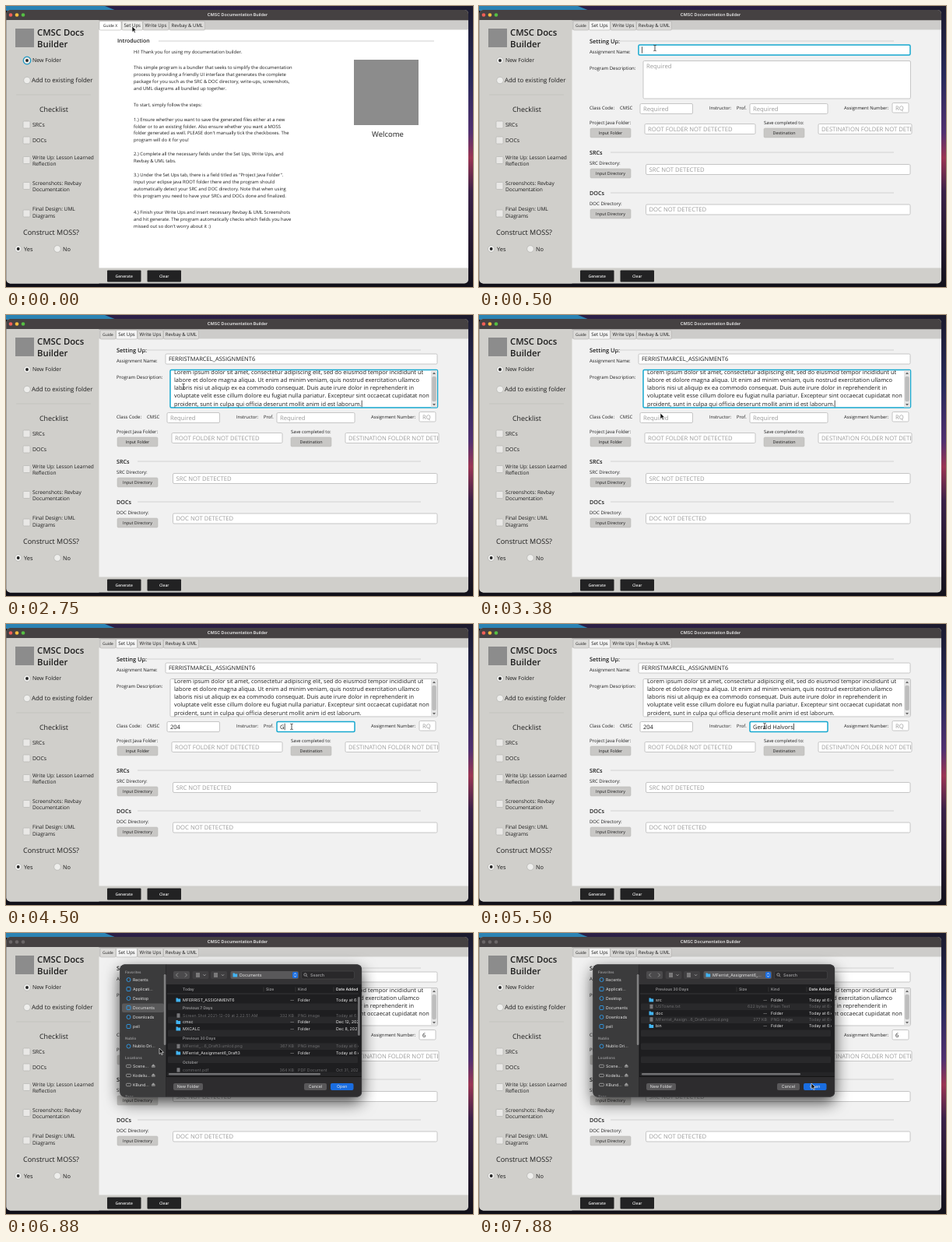
Write an HTML page that moves like this. It is 600 by 361 pixels and loops after 8000 ms.

```html
<!DOCTYPE html>
<html lang="en">
<head>
<meta charset="utf-8">
<title>CMSC Documentation Builder</title>
<style>
  html, body { margin: 0; width: 100%; height: 100%; overflow: hidden; background: #111018; }
  svg { display: block; width: 600px; height: 361px; }
  text { font-family: "Open Sans", "Noto Sans", sans-serif; text-rendering: geometricPrecision; fill: #1c1c1c; white-space: pre; }
  .mac text { font-family: Inter, Roboto, sans-serif; fill: #e6e6e6; }
  .mac .dim { fill: #6b6b6d; }
  .mac .head { fill: #98989a; font-weight: 600; }
  .mid { text-anchor: middle; }
  .semi { font-weight: 600; }
  text.light { fill: #f4f4f4; }
  text.prompt { fill: #9b9b9b; font-size: 7.7px; }
</style>
</head>
<body>
<svg id="stage" viewBox="0 0 600 361" xmlns="http://www.w3.org/2000/svg"></svg>
<script>
const STEP = 125, LOOP = 8000;
const stage = document.getElementById('stage');

// Markup helpers; text is placed by its vertical centre.
const text = (x, y, size, str, cls = '') =>
  `<text x="${x}" y="${(y + size * .35).toFixed(2)}" font-size="${size}" class="${cls}">${str}</text>`;
const box = (x, y, w, h, fill, r = 0, more = '') =>
  `<rect x="${x}" y="${y}" width="${w}" height="${h}" rx="${r}" fill="${fill}" ${more}/>`;
const line = (x1, y, x2, color) =>
  `<path d="M${x1} ${y}H${x2}" stroke="${color}" stroke-width=".8"/>`;
const group = (id, body, more = '') => `<g id="${id}" ${more}>${body}</g>`;
const rows = (x, size, list) => list.map(([y, s]) => text(x, y, size, s)).join('');

const radio = (x, y, on) =>
  `<circle cx="${x}" cy="${y}" r="4.3" fill="#eeeeec" stroke="#b4b3b0" stroke-width=".7"/>` +
  (on ? `<circle cx="${x}" cy="${y}" r="1.9" fill="#222"/>` : '');
const check = y => box(22, y - 4.5, 9, 9, '#e9e8e6', 1.2, 'stroke="#b7b6b3" stroke-width=".7"');
const button = (y, s, x = 143) =>
  box(x, y, 52, 12, '#c8c7c5', 1.5, 'stroke="#b6b5b3" stroke-width=".5"') +
  text(x + 26, y + 6, 5.4, s, 'mid');

function desktop() {
  return `<defs>
    <linearGradient id="sky" x2="0" y2="1">
      <stop offset="0" stop-color="#1b1a2d"/><stop offset=".25" stop-color="#27295a"/>
      <stop offset=".45" stop-color="#513070"/><stop offset=".54" stop-color="#9a3453"/>
      <stop offset=".66" stop-color="#3a2148"/><stop offset="1" stop-color="#12111b"/>
    </linearGradient>
    <linearGradient id="top"><stop offset="0" stop-color="#2c2048"/><stop offset=".6" stop-color="#2b1f45"/>
      <stop offset="1" stop-color="#1b1a2d"/></linearGradient>
    <clipPath id="win"><rect x=".5" y="5" width="593.5" height="351.5" rx="5"/></clipPath>
    <clipPath id="area"><rect x="211" y="71" width="335" height="48"/></clipPath>
    <clipPath id="dest"><rect x="438" y="150" width="117" height="16"/></clipPath>
    <clipPath id="panel"><rect x="146.5" y="40.5" width="310.5" height="170" rx="6"/></clipPath>
    <clipPath id="list"><rect x="206" y="66" width="247" height="113"/></clipPath>
  </defs>` + box(0, 0, 600, 361, '#111018') + box(0, 0, 600, 6, 'url(#top)') +
    '<path d="M0 0H127L142 6H0z" fill="#2b83b4"/>' + box(592, 0, 8, 361, 'url(#sky)');
}

function sidebar() {
  return box(0, 18, 119.5, 339, '#d0cfcb') + box(12, 29, 24, 24, '#8c8c8c') +
    text(40, 34, 11.3, 'CMSC Docs', 'semi') + text(40, 49.5, 11.3, 'Builder', 'semi') +
    radio(27, 70, true) + radio(27, 95.5) + radio(15.7, 312, true) + radio(66, 312) +
    `<circle id="ring" cx="27" cy="70" r="4.8" fill="none" stroke="#1a9bc9" stroke-width="1.2"/>` +
    text(34, 70, 7, 'New Folder') + text(33, 95.5, 7.9, 'Add to existing folder') +
    line(13, 114, 109, '#c1c0bc') + text(43, 133, 8.9, 'Checklist') +
    [152.5, 172.5, 198, 231, 266.5].map(check).join('') +
    rows(34, 6.9, [[152.5, 'SRCs'], [172.5, 'DOCs']]) +
    rows(34, 6.6, [[194.5, 'Write Up: Lesson Learned'], [203, 'Reflection'], [227.5, 'Screenshots: Revbay'],
      [236, 'Documentation'], [261, 'Final Design: UML'], [269.5, 'Diagrams']]) +
    text(22, 290.5, 9, 'Construct MOSS?') + text(23, 312, 7.4, 'Yes') + text(73, 312, 7.4, 'No');
}

// Tab strip: [left, width, label, size]; the open and the hovered tab are lighter.
const strip = (list, open, fill, hover) => list.map(([x, w, s, size], i) =>
  box(x, 19.5, w, 11.5, i === open ? fill : i === hover ? '#ececea' : '#dbdad8', 1.5,
    'stroke="#b4b3b1" stroke-width=".6"') +
  text(x + w / 2, 25.3, size, s, 'mid')).join('');

function guide() {
  const lines = [[58.5, 'Hi! Thank you for using my documentation builder.'],
    [78.7, 'This simple program is a bundler that seeks to simplify the documentation'],
    [88, 'process by providing a friendly UI interface that generates the complete'],
    [97, 'package for you such as the SRC &amp; DOC directory, write-ups, screenshots,'],
    [106, 'and UML diagrams all bundled up together.'], [127, 'To start, simply follow the steps:'],
    [145.5, '1.) Ensure whether you want to save the generated files either at a new'],
    [154.5, 'folder or to an existing folder. Also ensure whether you want a MOSS'],
    [163, "folder generated as well. PLEASE don't manually tick the checkboxes. The"],
    [171.7, 'program will do it for you!'],
    [189.5, '2.) Complete all the necessary fields under the Set Ups, Write Ups, and'],
    [198.5, 'Revbay &amp; UML tabs.'],
    [216.5, '3.) Under the Set Ups tab, there is a field titled as "Project Java Folder".'],
    [225.5, 'Input your eclipse java ROOT folder there and the program should'],
    [234.5, 'automatically detect your SRC and DOC directory. Note that when using'],
    [243.5, 'this program you need to have your SRCs and DOCs done and finalized.'],
    [264.7, '4.) Finish your Write Ups and insert necessary Revbay &amp; UML Screenshots'],
    [273.8, 'and hit generate. The program automatically checks which fields you have'],
    [282.5, "missed out so don't worry about it :)"]];
  return box(119.5, 30.5, 474.5, 306, '#fff') +
    strip([[120, 28, 'Guide X', 5.1], [149, 26.5, 'Set Ups', 6.1], [176, 33, 'Write Ups', 6.1],
      [210, 45.5, 'Revbay &amp; UML', 6]], 0, '#fff', 1) +
    text(143, 45, 6.9, 'Introduction', 'semi') + line(196, 45, 550, '#c4c4c4') +
    rows(164, 5.9, lines) + box(447, 69, 83, 84, '#8c8c8c') + text(490.5, 164.5, 9.5, 'Welcome', 'mid');
}

// Input fields: position, size and prompt.
const FIELDS = {
  name: [205, 50, 349, 13, ''], about: [211, 70.5, 343.5, 48.5, 'Required'],
  code: [207, 125.5, 67.5, 13, 'Required'], prof: [348, 125.5, 100, 13, 'Required'],
  num: [531, 124.5, 21, 12.5, 'RQ'], root: [213, 151.5, 142, 13, 'ROOT FOLDER NOT DETECTED'],
  dest: [436, 151.5, 120, 13, 'DESTINATION FOLDER NOT DETECTED'],
  src: [214.5, 203.5, 339.5, 13, 'SRC NOT DETECTED'], doc: [214.5, 255, 339.5, 13, 'DOC NOT DETECTED']
};
const field = ([id, [x, y, w, h, prompt]]) =>
  box(x, y, w, h, '#fff', 1.5, `id="${id}Box" stroke="#b9b9b9" stroke-width=".8"`) +
  `<g ${id === 'dest' ? 'clip-path="url(#dest)"' : ''}>` +
  `<text id="${id}Text" x="${x + 4}" y="${y + 9.1}" font-size="7.5" class="prompt">${prompt}</text></g>`;

const LOREM = ['Lorem ipsum dolor sit amet, consectetur adipiscing elit, sed do eiusmod tempor incididunt ut',
  'labore et dolore magna aliqua. Ut enim ad minim veniam, quis nostrud exercitation ullamco',
  'laboris nisi ut aliquip ex ea commodo consequat. Duis aute irure dolor in reprehenderit in',
  'voluptate velit esse cillum dolore eu fugiat nulla pariatur. Excepteur sint occaecat cupidatat non',
  'proident, sunt in culpa qui officia deserunt mollit anim id est laborum.'];

function form() {
  const bar = box(546, 71, 8, 47.5, '#e4e4e4') + box(547.2, 79, 5.6, 32, '#bdbdbd', 2) +
    '<path d="M548 76l2-2.5 2 2.5zM548 114l2 2.5 2-2.5z" fill="#666"/>';
  return box(119.5, 30.5, 474.5, 306, '#f1f1f1') +
    strip([[121, 20, 'Guide', 5], [141.5, 27, 'Set Ups', 6.1], [169, 33, 'Write Ups', 6.1],
      [202.5, 45, 'Revbay &amp; UML', 6]], 1, '#f4f4f4') +
    text(142, 45, 7.4, 'Setting Up:', 'semi') + line(174, 45, 533, '#c9c9c9') +
    text(142, 188, 7.2, 'SRCs', 'semi') + line(169, 188, 533, '#c9c9c9') +
    text(142, 240, 7.2, 'DOCs', 'semi') + line(169, 240, 533, '#c9c9c9') +
    rows(142, 6, [[59, 'Assignment Name:'], [79.5, 'Program Description:'], [131, 'Class Code:'],
      [150, 'Project Java Folder:'], [202, 'SRC Directory:'], [254, 'DOC Directory:']]) +
    text(181, 131, 6, 'CMSC') + text(296, 131, 5.8, 'Instructor:') + text(331, 131, 5.8, 'Prof.') +
    text(469, 131, 5.8, 'Assignment Number:') + text(366, 150, 5.8, 'Save completed to:') +
    button(157, 'Input Folder') + button(157, 'Destination', 366) +
    button(209, 'Input Directory') + button(261, 'Input Directory') +
    Object.entries(FIELDS).map(field).join('') +
    group('lorem', `<g clip-path="url(#area)">${rows(216, 7.4, LOREM.map((s, i) => [73.6 + i * 10.1, s]))}</g>` + bar) +
    box(0, 0, .7, 8.5, '#111', 0, 'id="caret"');
}

const BLUE = '#2f9bea';
const folder = (x, y) =>
  `<path d="M${x} ${y - 2.4}h2l.7.8h3v4h-5.7z" fill="#42b4f2"/>`;

// File list row: height, folder flag, name, size, kind, date.
const fileRow = ([y, dir, name, size, kind, date]) => {
  const cls = dir ? '' : 'dim';
  return (dir ? folder(218.5, y) : box(219.5, y - 2.7, 4, 5.4, '#77777a', .5)) +
    text(227, y, 5.3, name, cls) +
    `<g text-anchor="end">${text(370, y, 5.3, size, cls)}</g>` +
    text(375, y, 5.3, kind, cls) + text(424, y, 5.3, date, cls);
};
const now = 'Today at 6:42 PM';
const listing = (title, files, groups) =>
  Array.from({ length: 11 }, (_, i) =>
    i % 2 ? box(208, 82 + i * 8.5, 244, 8.5, '#29292b', 1.5) : '').join('') +
  text(227, 72.5, 5, title, 'head') + files.map(fileRow).join('') +
  groups.map(([y, s]) => text(227, y, 5, s, 'head')).join('');

function dialog() {
  const places = [[60, 'Recents'], [72, 'Applicati...'], [84, 'Desktop'], [96, 'Documents'], [108, 'Downloads'],
    [120, 'pell'], [145.5, 'Nublio Dri...']];
  const drives = [[171, 'Scene...'], [183, 'Kodeliu...'], [195, 'KBund...']];
  const heads = [[50, 'Favorites'], [135, 'Nublio'], [160.5, 'Locations'], [210, 'Tags']];
  const side = box(146, 38, 60, 173, '#3b3b3c') + box(205.6, 38, .7, 173, '#111') +
    box(149, 90.5, 54, 11.5, '#59595a', 2, 'id="picked"') +
    heads.map(([y, s]) => text(153, y, 4.6, s, 'head')).join('') +
    places.map(([y, s], i) => (i % 2
      ? box(155, y - 2.5, 5, 5, 'none', 1, `stroke="${BLUE}" stroke-width=".9"`)
      : `<circle cx="157.5" cy="${y}" r="2.5" fill="none" stroke="${BLUE}" stroke-width=".9"/>`) +
      text(163, y, 5.2, s)).join('') +
    drives.map(([y, s]) => box(154.5, y - 1.7, 6, 3.4, 'none', 1, 'stroke="#aaa" stroke-width=".8"') +
      text(163, y, 5.2, s) +
      `<path d="M187 ${y + .3}l2.3-2.6 2.3 2.6zM187 ${y + 1.5}h4.6" fill="#a4a4a4" stroke="#a4a4a4" stroke-width=".6"/>`).join('') +
    box(202.8, 53, 2.6, 91, '#818182', 1.3);
  const tools = box(206, 38, 252, 28, '#343335') +
    box(215, 49, 21, 10, '#4b4a4c', 2) + box(239.5, 49, 21, 10, '#403f41', 2) + box(263, 49, 21, 10, '#403f41', 2) +
    '<path d="M221 51.5l-2.5 2.5 2.5 2.5M230 51.5l2.5 2.5-2.5 2.5" fill="none" stroke="#a2a2a3" stroke-width=".8"/>' +
    '<path d="M244 52h5M244 54h5M244 56h5M267 52h5M267 54h5M267 56h5" stroke="#d0d0d0" stroke-width=".8"/>' +
    '<path d="M253.5 53.3l1.5 1.5 1.5-1.5M277 53.3l1.5 1.5 1.5-1.5" fill="none" stroke="#c4c4c4" stroke-width=".7"/>' +
    box(288.5, 49, 87.5, 10, '#59585a', 2) + folder(291.5, 54) + box(368, 50, 7, 8, '#1a6de0', 1.7) +
    '<path d="M370 53.3l1.5-1.7 1.5 1.7M370 54.7l1.5 1.7 1.5-1.7" fill="none" stroke="#fff" stroke-width=".7"/>' +
    '<text id="where" x="300" y="55.9" font-size="5.3"></text>' +
    box(379.5, 49, 68, 10, '#29282a', 2, 'stroke="#4b4a4c" stroke-width=".6"') +
    '<circle cx="384.5" cy="53.5" r="1.7" fill="none" stroke="#c0c0c0" stroke-width=".7"/>' +
    '<path d="M385.8 54.8l1.5 1.5" stroke="#c0c0c0" stroke-width=".7"/>' +
    text(391, 54, 5.3, 'Search', 'head');
  const docs = listing('Today', [
    [86, 1, 'MFERRIST_ASSIGNMENT6', '--', 'Folder', now],
    [106, 0, 'Screen Shot 2021-12-09 at 2.22.51 AM', '332 KB', 'PNG image', now],
    [114.5, 1, 'cmsc', '--', 'Folder', 'Dec 12, 2021'], [123, 1, 'MXCALC', '--', 'Folder', 'Dec 8, 2021'],
    [145.5, 0, 'MFerrist_...6_Draft3.umlcd.png', '367 KB', 'PNG image', now],
    [154, 1, 'MFerrist_Assignment6_Draft3', '--', 'Folder', now],
    [176, 0, 'comment.pdf', '364 KB', 'PDF Document', 'Oct 31, 2021']
  ], [[96.5, 'Previous 7 Days'], [135, 'Previous 30 Days'], [166.5, 'October']]);
  const inner = listing('Previous 30 Days', [
    [86, 1, 'src', '--', 'Folder', now], [94.5, 0, 'USTowns.txt', '622 bytes', 'Plain Text', now],
    [103, 1, 'doc', '--', 'Folder', now],
    [111, 0, 'MFerrist_Assign...6_Draft3.umlcd.png', '277 KB', 'PNG image', now],
    [119.5, 1, 'bin', '--', 'Folder', now]], []);
  const heading = [[334, 'Size'], [375, 'Kind']].map(([x, s]) => text(x, 72.5, 5, s, 'head')).join('') +
    text(424, 72.5, 5, 'Date Added', 'semi') + line(207, 78, 453, '#3d3d3f') +
    '<path d="M331 69.5v6M372 69.5v6M421 69.5v6" stroke="#444446" stroke-width=".6"/>';
  const foot = box(206, 184.5, 252, 27, '#2d2c2e') + line(206, 184.5, 458, '#101010') +
    [[215, 38, 'New Folder', '#59585a'], [383, 29, 'Cancel', '#59585a'], [417, 29.5, 'Open', '#1a6de0']]
      .map(([x, w, s, c]) => box(x, 193, w, 9, c, 2) + text(x + w / 2, 197.4, 5.3, s, 'mid')).join('');
  return box(146.5, 40.5, 310.5, 170, '#1e1e20', 6, 'style="filter:drop-shadow(0 7px 10px #000b)"') +
    `<g clip-path="url(#panel)">${box(206, 66, 252, 120, '#1e1e20')}${side}${tools}${foot}
    <g clip-path="url(#list)">${group('docs', docs)}${group('inner', inner)}${heading}</g>
    ${box(207, 178.8, 250, 5, '#252527')}${box(209, 180, 195, 2.6, '#727274', 1.3, 'id="thumb"')}
    ${box(452, 82, 2.8, 50, '#727274', 1.4, 'id="vThumb"')}</g>` +
    box(146.7, 40.7, 310.1, 169.6, 'none', 6, 'stroke="#4a4a4c" stroke-width=".5"');
}

stage.innerHTML = desktop() + '<g clip-path="url(#win)">' + box(0, 5, 594, 352, '#d0cfcb') +
  box(0, 5, 594, 13.5, '#454142') +
  [6, 14, 22].map(x => `<circle class="lamp" cx="${x}" cy="11.5" r="2.3"/>`).join('') +
  `<g class="mac">${text(297.5, 11.5, 5.4, 'CMSC Documentation Builder', 'mid semi')}</g>` +
  box(119.5, 18.5, 474.5, 12, '#cdccca') + sidebar() + group('guide', guide()) + group('form', form()) +
  [[130, 'Generate'], [181.5, 'Clear']].map(([x, s]) =>
    box(x, 339.5, 43.5, 15, '#222223', 1) + text(x + 21.7, 347, 5, s, 'mid semi light')).join('') +
  '</g>' + group('dialog', dialog(), 'class="mac"') +
  group('arrow', '<path d="M0 0v7.5l1.8-1.6 1.2 2.7 1.3-.6-1.2-2.6h2.4z" fill="#111" stroke="#fff" stroke-width=".6"/>') +
  group('beam', '<path d="M-1.7-3.7Q0-3.7 0-2.7Q0-3.7 1.7-3.7M0-2.7V2.7M-1.7 3.7Q0 3.7 0 2.7Q0 3.7 1.7 3.7" fill="none" stroke="#222" stroke-width=".8"/>');

const el = id => document.getElementById(id);
const show = (id, on) => el(id).setAttribute('visibility', on ? 'visible' : 'hidden');
const typed = (str, t, start, pace) => str.slice(0, Math.max(0, Math.floor((t - start) / pace)));

// Pointer stops: time, x, y, text beam from here on.
const PATH = [[0, 162, 26, 0], [250, 162, 26, 0], [500, 226, 54, 1], [2500, 226, 54, 1], [2625, 228, 92, 1],
  [3125, 228, 92, 1], [3375, 233, 126, 0], [3500, 234, 131, 1], [3875, 234, 131, 0], [4250, 367, 132, 1],
  [5500, 367, 131, 1], [5625, 367, 131, 0], [5875, 541, 131, 1], [6125, 541, 131, 0], [6500, 172, 163, 0],
  [6625, 172, 163, 0], [6875, 197, 148, 0], [7250, 262, 152, 0], [7375, 262, 152, 0],
  [7750, 427, 193, 0], [8000, 427, 193, 0]];
const FOCUS = [[0, ''], [500, 'name'], [2625, 'about'], [3500, 'code'], [4250, 'prof'], [5875, 'num'], [6500, '']];

function pointer(t) {
  const i = PATH.findIndex((p, k) => k === PATH.length - 1 || t < PATH[k + 1][0]);
  const a = PATH[i], b = PATH[i + 1] || a;
  const u = (t - a[0]) / (b[0] - a[0] || 1), e = u * u * (3 - 2 * u);
  const place = `translate(${a[1] + (b[1] - a[1]) * e} ${a[2] + (b[2] - a[2]) * e})`;
  for (const id of ['arrow', 'beam']) el(id).setAttribute('transform', place);
  show('arrow', !a[3]);
  show('beam', a[3]);
}

function fill(t) {
  const focus = FOCUS.filter(f => f[0] <= t).pop()[1];
  const pasted = t >= 2750;
  const values = {
    name: typed('FERRISTMARCEL_ASSIGNMENT6', t, 600, 77), code: typed('204', t, 3500, 100),
    prof: typed('Gerald Halvorsen', t, 4420, 77), num: typed('6', t, 5900, 100), about: pasted ? ' ' : ''
  };
  for (const [id, value] of Object.entries(values)) {
    const on = id === focus, label = el(id + 'Text'), frame = el(id + 'Box');
    label.textContent = value || FIELDS[id][4];
    label.setAttribute('class', value ? '' : 'prompt');
    frame.setAttribute('stroke', on ? '#16a8cf' : '#b9b9b9');
    frame.setAttribute('stroke-width', on ? 1.5 : .8);
  }
  show('lorem', pasted);
  show('caret', focus);
  if (!focus) return;
  const last = focus === 'about' && pasted ? el('lorem').querySelectorAll('text')[4] : el(focus + 'Text');
  const width = values[focus] ? last.getComputedTextLength() : 0;
  el('caret').setAttribute('x', +last.getAttribute('x') + width + .3);
  el('caret').setAttribute('y', +last.getAttribute('y') - 6.9);
}

function draw(t) {
  const setup = t >= 250, open = t >= 6625, inside = t >= 7375;
  show('guide', !setup);
  show('ring', !setup);
  el('form').style.display = setup ? '' : 'none';
  el('dialog').style.display = open ? '' : 'none';
  const lamps = open ? ['#6a6667', '#6a6667', '#6a6667'] : ['#f25f57', '#f3bc3e', '#55c043'];
  stage.querySelectorAll('.lamp').forEach((c, i) => c.setAttribute('fill', lamps[i]));
  if (setup) fill(t);
  else for (const id of ['lorem', 'caret']) show(id, false);
  if (open) {
    el('docs').style.display = inside ? 'none' : '';
    el('inner').style.display = inside ? '' : 'none';
    for (const id of ['picked', 'vThumb']) el(id).style.display = inside ? 'none' : '';
    el('thumb').setAttribute('width', inside ? 204 : 195);
    el('where').textContent = inside ? 'MFerrist_Assignment6_...' : 'Documents';
  }
  pointer(t);
}

const begin = performance.now();
let shown = -1;
function tick() {
  const step = Math.floor((performance.now() - begin) % LOOP / STEP);
  if (step !== shown) draw((shown = step) * STEP);
  requestAnimationFrame(tick);
}
tick();
</script>
</body>
</html>
```
